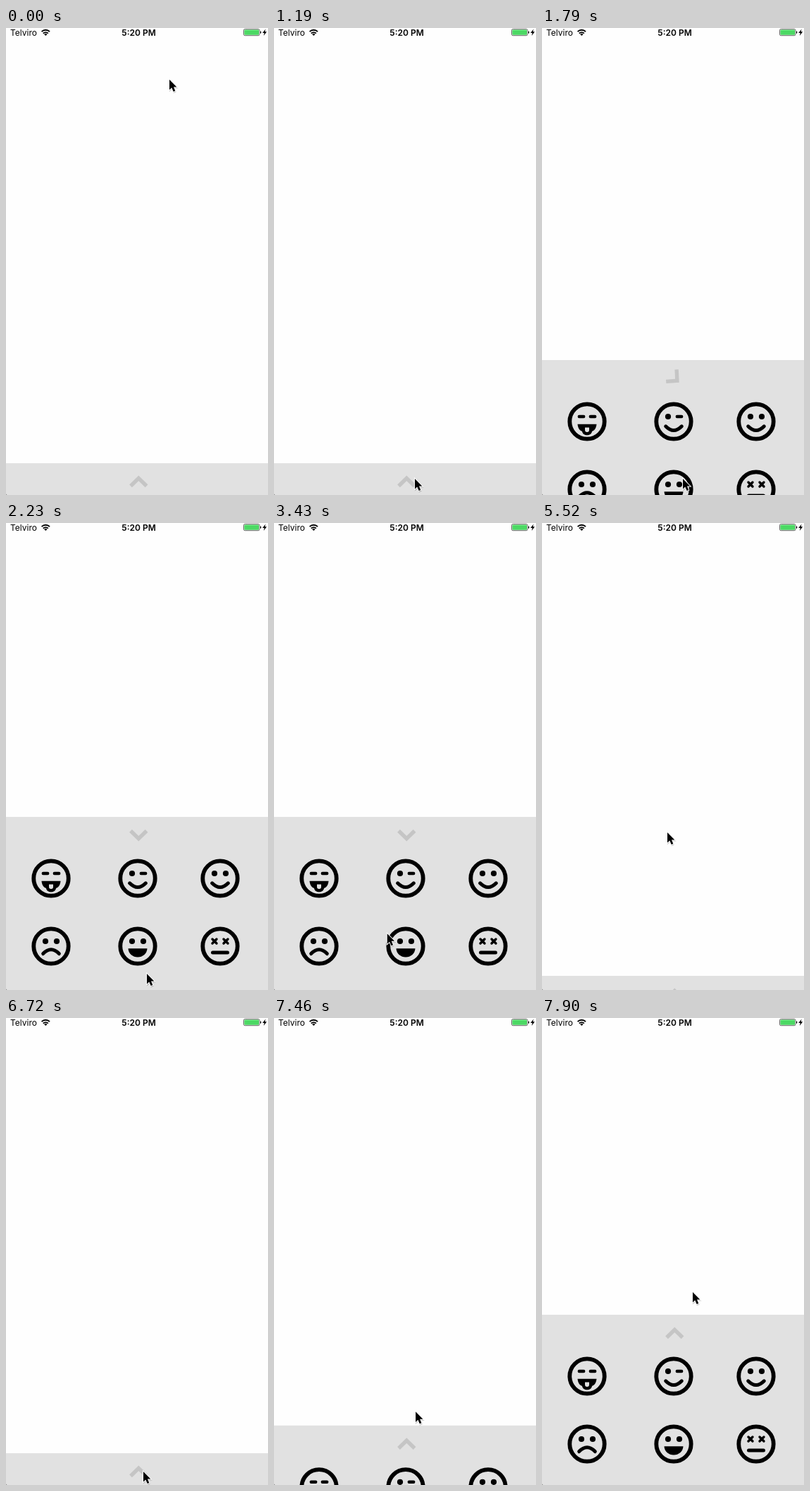
An HTML page that plays this animation: 372x661 px, repeating every 8 s.

```html
<!DOCTYPE html>
<html lang="en">
<head>
<meta charset="utf-8">
<title>Emoji drawer</title>
<style>
  html, body { margin: 0; width: 100%; height: 100%; overflow: hidden; background: #fefefe; }
  svg { display: block; width: 100%; height: 100%; }
  text { font: 12px Inter, sans-serif; }
  .line { fill: none; stroke: #000; stroke-width: 5; stroke-linecap: round; }
  .eye { stroke-width: 4.4; }
  .cross { stroke-width: 3.4; }
</style>
</head>
<body>
<svg viewBox="0 0 372 661">
  <defs>
    <g id="ring"><circle r="24.7" fill="none" stroke="#000" stroke-width="5.8"/></g>
    <circle id="dot" cy="-7" r="4.1"/>
    <path id="dash" class="line eye" d="M-3.2-7H3.2"/>
    <path id="cross" class="line cross" d="M-3-10L3-4M3-10L-3-4"/>
    <path id="smile" class="line" d="M-11.3 6.8Q0 18.4 11.3 6.8"/>
    <path id="frown" class="line" d="M-11.3 10.6Q0-1 11.3 10.6"/>
    <path id="grin" d="M-13.5 3.3H13.5C13 11 7 15.5 0 15.5S-13 11-13.5 3.3Z"/>
    <path id="flat" class="line" d="M-10.5 9H10.5"/>
    <g id="tongue">
      <path d="M-13.5 3.8H13.5C13 9 11 12.5 7 14C6.5 17.5 3.5 19.3 0 19.3S-6.5 17.5-7 14C-11 12.5-13 9-13.5 3.8Z"/>
      <path d="M-3 8.5H3V12A3 3 0 0 1-3 12Z" fill="#e1e1e1"/>
    </g>
  </defs>

  <rect width="372" height="661" fill="#fefefe"/>
  <text x="6" y="10.7">Telviro</text>
  <g fill="none" stroke="#000" stroke-width="1.9">
    <path d="M50.6 5.2A8 8 0 0 1 62 5.2M52.8 7.6A4.8 4.8 0 0 1 59.8 7.6"/>
  </g>
  <path d="M56.3 11L54.2 8.9A3 3 0 0 1 58.4 8.9Z"/>
  <text x="188.5" y="10.7" text-anchor="middle" style="font-weight:600">5:20 PM</text>
  <rect x="337.5" y="1.5" width="22.5" height="9.2" rx="1.8" fill="#fff" stroke="#555" stroke-width=".9"/>
  <rect x="338.4" y="2.4" width="20.7" height="7.4" rx="1" fill="#4cd964"/>
  <path d="M361 4.2Q362.4 4.7 362.4 6.1T361 8Z"/>
  <path d="M368.6 1.5L364.2 7H366.8L365.8 11L370.2 5.2H367.6Z"/>

  <g id="panel">
    <rect width="372" height="300" fill="#e1e1e1"/>
    <path id="chevron" d="M-11.3 6.2L0-4.8L11.3 6.2" fill="none" stroke="#c5c5c5" stroke-width="5.4"/>
    <g id="faces"></g>
  </g>
  <path d="M0 659.2V661H1.8Q.4 660.6 0 659.2Z" fill="#777"/>
  <g id="cursor">
    <path d="M0 0V14.6L3.3 11.5L5.7 17L8.3 15.9L6 10.5H10.4Z" fill="#000" opacity=".2" transform="translate(.5 1.4)" stroke="#000" stroke-width="1.4"/>
    <path d="M0 0V14.6L3.3 11.5L5.7 17L8.3 15.9L6 10.5H10.4Z" stroke="#fff" stroke-width="1.8" paint-order="stroke"/>
  </g>
</svg>
<script>
const LOOP = 8000, CLOSED = 616, TRAVEL = 200;
const get = id => document.getElementById(id);
const panel = get('panel'), chevron = get('chevron'), cursor = get('cursor');

// Each face: left eye, right eye, mouth
const faces = [
  ['dash', 'dash', 'tongue'], ['dot', 'dash', 'smile'], ['dot', 'dot', 'smile'],
  ['dot', 'dot', 'frown'], ['dot', 'dot', 'grin'], ['cross', 'cross', 'flat']
];
get('faces').innerHTML = faces.map(([left, right, mouth], i) =>
  `<g transform="translate(${[64, 187, 304][i % 3]} ${i < 3 ? 87 : 183})">
    <use href="#ring"/><use href="#${left}" x="-8"/><use href="#${right}" x="8"/><use href="#${mouth}"/>
  </g>`).join('');

// Pointer moves: start, end, steps, curve control point, destination
const moves = [
  [150, 300, 2, [242, 264], [221, 454]],
  [600, 1190, 5, [209, 546], [200, 638]],
  [3280, 4320, 8, [99, 520], [178, 438]],
  [6120, 6720, 5, [192, 540], [195, 642]],
  [7170, 7900, 6, [204, 515], [214, 388]]
];

// Number of steps already taken in a stepped move
function stepAt(t, start, end, steps) {
  if (t < start) return 0;
  return Math.min(steps, 1 + Math.floor((t - start) / (end - start) * (steps - 1) + 1e-6));
}

function pointerAt(t) {
  let point = [232, 73];
  for (const [start, end, steps, control, target] of moves) {
    if (t < start) break;
    const p = stepAt(t, start, end, steps) / steps, q = 1 - p;
    point = point.map((v, i) => q * q * v + 2 * p * q * control[i] + p * p * target[i]);
  }
  return point;
}

function panelAt(t) {
  if (t < 5520) {
    const top = [CLOSED, 470, 421, 415.5, 416][stepAt(t, 1790, 2230, 4)];
    return [top, 180 * Math.min(1, (CLOSED - top) / TRAVEL)];
  }
  if (t < 7170) return [[641, 618, CLOSED][stepAt(t, 5520, 5820, 3) - 1], 0];
  // The dragged panel trails the pointer by one step
  return [CLOSED - 196 * (stepAt(t, 7170, 7900, 6) - 1) / 5, 0];
}

function draw(now) {
  const t = now % LOOP;
  const [top, angle] = panelAt(t);
  panel.setAttribute('transform', `translate(0 ${top})`);
  chevron.setAttribute('transform', `translate(188.3 26) rotate(${angle})`);
  cursor.setAttribute('transform', `translate(${pointerAt(t)})`);
}

const begin = performance.now();
function tick() {
  draw(performance.now() - begin);
  requestAnimationFrame(tick);
}
tick();
</script>
</body>
</html>
```
